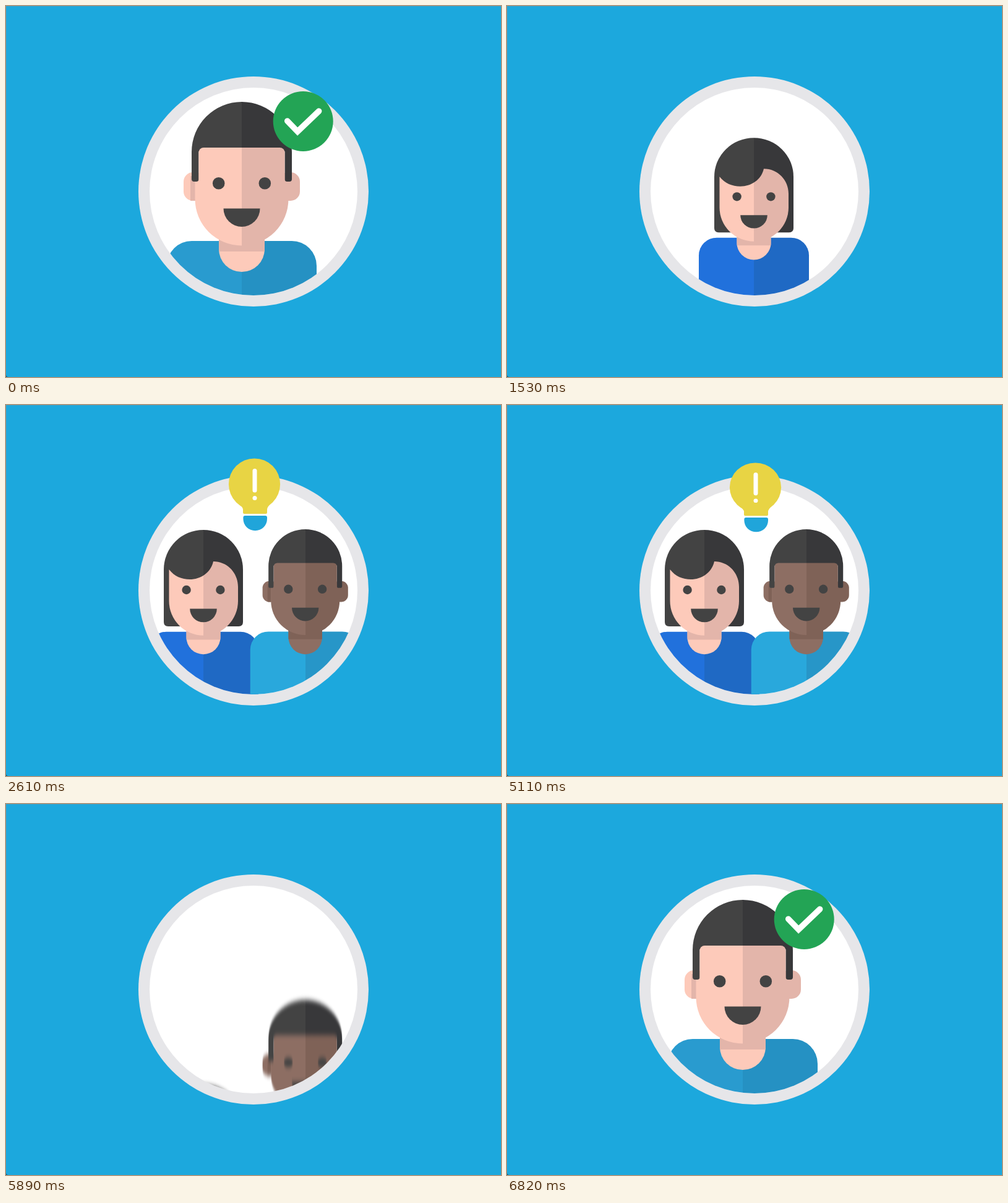
Recreate the animation shown at these times as an HTML page. Size 800 by 600 pixels, loop 8.82 s.

```html
<!DOCTYPE html>
<html lang="en">
<head>
<meta charset="utf-8">
<title>Team avatars</title>
<style>
  html, body { margin: 0; width: 100%; height: 100%; overflow: hidden; background: #1ca8dd; }
  svg { display: block; width: 100vw; height: 100vh; }
</style>
</head>
<body>
<svg id="stage" viewBox="0 0 800 600"></svg>
<script>
const LOOP = 8820;
const FLOOR = 467;
const DARK = '#434343';
const PALE = { light: '#fdcaba', shade: '#e3b5aa' };
const BROWN = { light: '#8d6e63', shade: '#7f6257' };

const stage = document.getElementById('stage');

// Hard two-tone fill, split on the vertical axis x = 0
const twoTone = (id, left, right) => `
  <linearGradient id="${id}" gradientUnits="userSpaceOnUse" x1="-200" x2="200" y1="0" y2="0">
    <stop offset=".5" stop-color="${left}"/><stop offset=".5" stop-color="${right}"/>
  </linearGradient>`;

const blurFilter = name => `
  <filter id="blur-${name}" filterUnits="userSpaceOnUse" x="150" y="50" width="500" height="500"
    color-interpolation-filters="sRGB"><feGaussianBlur stdDeviation="0"/></filter>`;

const eyes = (dx, y, r) =>
  [-dx, dx].map(x => `<circle cx="${x}" cy="${y}" r="${r}" fill="${DARK}"/>`).join('');

const mouth = (y, r) => `<path d="M${-r} ${y}H${r}A${r} ${r} 0 0 1 ${-r} ${y}Z" fill="${DARK}"/>`;

const shirt = (w, y, r, fill) =>
  `<path d="M${-w} 700V${y + r}a${r} ${r} 0 0 1 ${r} ${-r}H${w - r}a${r} ${r} 0 0 1 ${r} ${r}V700Z" fill="url(#${fill})"/>`;

const neck = (r, top, y, shadeEnd, skin) => `
  <path d="M${-r} ${top}V${y}A${r} ${r} 0 0 0 ${r} ${y}V${top}Z" fill="${skin.light}"/>
  <path d="M${-r} ${top}H${r}V${shadeEnd}H${-r}Z" fill="${skin.shade}"/>`;

// Short-haired figure; y = 0 is the top of the head
const man = (skin, skinFill, shirtFill) => `
  ${shirt(121, 225, 40, shirtFill)}
  ${neck(37, 200, 238, 242, skin)}
  <path id="ear" d="M-75 160h-4a15 15 0 0 1-15-15v-16a15 15 0 0 1 15-15h4z" fill="${skin.light}"/>
  <path d="M-83 120h8v40h-8z" fill="${skin.shade}"/>
  <path d="M75 160h4a15 15 0 0 0 15-15v-16a15 15 0 0 0-15-15h-4z" fill="${skin.shade}"/>
  <path d="M-75.5 115V157A75.5 75.5 0 0 0 75.5 157V115Z" fill="url(#${skinFill})"/>
  <path d="M-81 81A81 81 0 0 1 81 81V125q0 4-4 4h-3.5q-4 0-4-4V80H-69.5V125q0 4-4 4h-3.5q-4 0-4-4Z" fill="url(#hair)"/>
  <rect x="-69.5" y="74" width="139" height="64" rx="8" fill="url(#${skinFill})"/>
  ${eyes(37.3, 131.7, 9.8)}
  ${mouth(172.5, 29.5)}`;

const woman = `
  <path d="M-64 266A64 64 0 0 1 64 266V351q0 7-7 7H-57q-7 0-7-7Z" fill="url(#hair)"/>
  ${shirt(89, 366.7, 29, 'navy')}
  ${neck(27.5, 350, 375.7, 379.5, PALE)}
  <path d="M-55.5 266C-47 277-35 282-22 282C-4 282 12 271 16 253C39 253 56 272 56 294V317A55.7 55.7 0 0 1-55.5 317Z" fill="url(#pale)"/>
  ${eyes(27.4, 299, 7.2)}
  ${mouth(329.5, 21.8)}`;

const figure = (name, art) =>
  `<g id="${name}-blur"><g id="${name}">${art}</g></g>`;

stage.innerHTML = `
  <defs>
    ${twoTone('hair', DARK, '#38383a')}
    ${twoTone('pale', PALE.light, PALE.shade)}
    ${twoTone('brown', BROWN.light, BROWN.shade)}
    ${twoTone('teal', '#299bcf', '#2591c3')}
    ${twoTone('sky', '#29a8dc', '#2796c8')}
    ${twoTone('navy', '#2171dc', '#1f69c4')}
    ${['host', 'woman', 'guest'].map(blurFilter).join('')}
    <clipPath id="window"><circle cx="400" cy="300" r="168"/></clipPath>
  </defs>
  <rect width="800" height="600" fill="#1ca8dd"/>
  <path d="M0 .5H800M.5 0V470" stroke="#4a9cbd" fill="none" opacity=".7"/>
  <path d="M0 596q0 4 4 4H0z" fill="#17536b"/>
  <circle cx="400" cy="300" r="186" fill="#e6e6e9"/>
  <circle cx="400" cy="300" r="168" fill="#fff"/>
  <g clip-path="url(#window)">
    ${figure('host', `<g transform="translate(0 155)">${man(PALE, 'pale', 'teal')}</g>`)}
    ${figure('woman', woman)}
    ${figure('guest', `<g transform="translate(0 201) scale(.735)">${man(BROWN, 'brown', 'sky')}</g>`)}
  </g>
  <g id="badge">
    <circle r="48.5" fill="#23a455"/>
    <path d="M-25.5-.5L-9 16.5L25.5-16.5" fill="none" stroke="#fff" stroke-width="9.5" stroke-linecap="round"/>
  </g>
  <g id="bulb">
    <circle cy="-75" r="41.6" fill="#e8d444"/>
    <path d="M-27-44Q-18.500-38-18.500-34V-29q0 2 2 2H18.500q2 0 2-2V-34Q20.500-38 27-44Z" fill="#e8d444"/>
    <path d="M-15-24H17.500q3 0 3 3v2a19.300 19.300 0 0 1-38.600 0v-2q0-3 3-3Z" fill="#20a5da"/>
    <path d="M.5-96.500V-65" stroke="#fff" stroke-width="7" stroke-linecap="round"/>
    <circle cx=".5" cy="-52.500" r="3.500" fill="#fff"/>
  </g>`;

const smooth = u => (1 - Math.cos(Math.PI * u)) / 2;
const speedUp = u => u * u;
const slowDown = u => 1 - (1 - u) ** 3;

// Keys are [time, values, ease into this key]
function track(keys, t) {
  const next = keys.findIndex(key => key[0] > t);
  if (next === 0) return keys[0][1];
  if (next < 0) return keys[keys.length - 1][1];
  const [t0, from] = keys[next - 1];
  const [t1, to, ease = smooth] = keys[next];
  const u = ease((t - t0) / (t1 - t0));
  return from.map((v, i) => v + (to[i] - v) * u);
}

// Figure values: x, vertical offset, vertical stretch
const leave = (start, x, drop) => [
  [start, [x, 0, 1]],
  [start + 170, [x, 18, 0.965]],
  [start + 240, [x, 13.7, 1.047]],
  [start + 298, [x, -8, 1.06], slowDown],
  [start + 480, [x, drop, 1.03], speedUp],
];
const arrive = (start, x, drop) => [
  [start, [x, drop, 1.05]],
  [start + 220, [x, -12, 1.06], slowDown],
  [start + 340, [x, 6, 0.98]],
  [start + 430, [x, 0, 1]],
];

const figures = {
  host: [...leave(630, 381, 345), ...arrive(6100, 381, 345)],
  woman: [
    [1110, [399, 290, 1.05]],
    [1330, [399, -12, 1.06], slowDown],
    [1500, [399, 6, 0.98]],
    [1620, [399, 6, 0.98]],
    [1900, [319, 0, 1]],
    ...leave(5420, 319, 290),
  ],
  guest: [...arrive(1650, 483.7, 290), ...leave(5470, 483.7, 290)],
};

const badgeScale = [
  [30, [1]], [260, [1.22]], [640, [0], speedUp],
  [6400, [0]], [6580, [1.2], slowDown], [6700, [0.95]], [6820, [1]],
];

// Bulb values: width, height, vertical offset
const bulbPose = [
  [2130, [0, 0, 0]],
  [2320, [1, 1.18, 0], slowDown],
  [2430, [1, 0.94, 0]],
  [2530, [1, 1.03, 0]],
  [2610, [1, 1, 0]],
  [5109, [1, 1, 0]],
  [5110, [1, 0.957, 2]],
  [5200, [1, 0.9, 4]],
  [5300, [1, 1.17, -2]],
  [5450, [0, 0, 0], speedUp],
];

const part = id => document.getElementById(id);
const place = (id, transform) => part(id).setAttribute('transform', transform);

function drawFigure(name, t) {
  const [x, dy, stretch] = track(figures[name], t);
  const [lastX, lastDy] = track(figures[name], Math.max(0, t - 30));
  const blur = d => Math.min(4, Math.abs(d) * 0.14);
  const bx = blur(x - lastX), by = blur(dy - lastDy);
  const wrap = part(name + '-blur');
  place(name, `translate(${x} ${FLOOR + dy}) scale(1 ${stretch}) translate(0 ${-FLOOR})`);
  if (bx + by > 0.15) {
    part('blur-' + name).firstElementChild.setAttribute('stdDeviation', `${bx} ${by}`);
    wrap.setAttribute('filter', `url(#blur-${name})`);
  } else {
    wrap.removeAttribute('filter');
  }
}

function draw(t) {
  Object.keys(figures).forEach(name => drawFigure(name, t));
  const [scale] = track(badgeScale, t);
  place('badge', `translate(480.2 186.5) scale(${scale})`);
  const [w, h, dy] = track(bulbPose, t);
  place('bulb', `translate(401.5 ${203 + dy}) scale(${w} ${h})`);
}

const start = performance.now();
function tick() {
  draw((performance.now() - start) % LOOP);
  requestAnimationFrame(tick);
}
tick();
</script>
</body>
</html>
```
